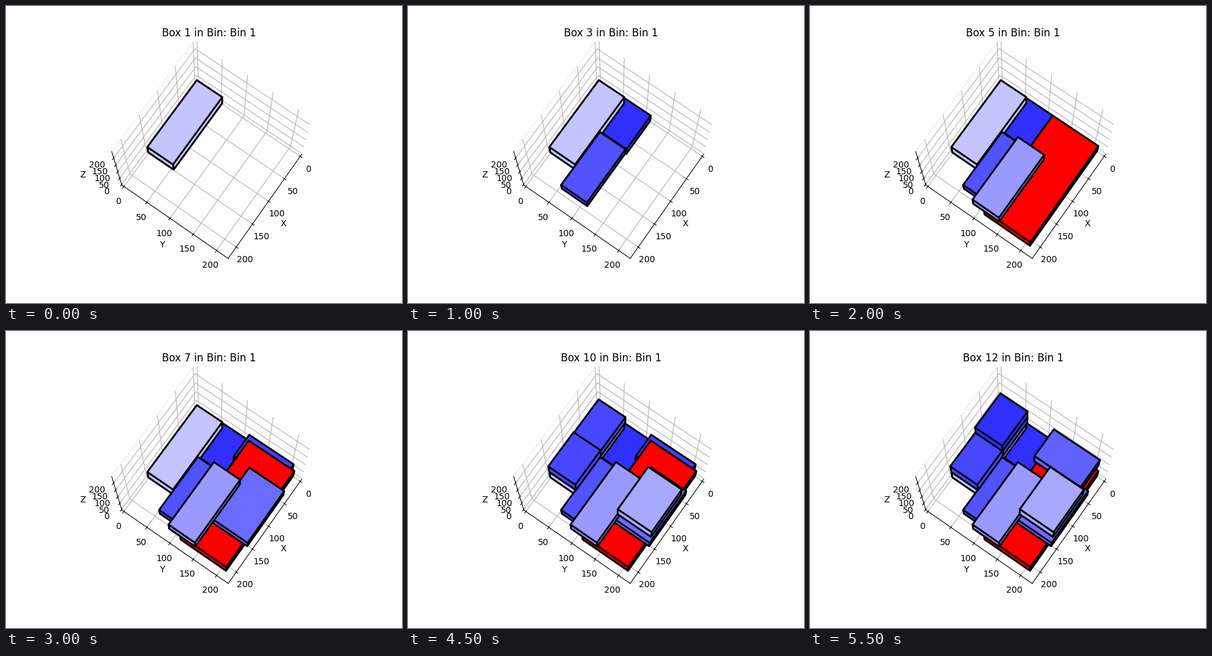
A matplotlib script for the animation above (6000 ms loop, 640 by 480 pixels).

```python
import matplotlib.pyplot as plt
import numpy as np
from itertools import product
from matplotlib.animation import FuncAnimation
from mpl_toolkits.mplot3d.art3d import Poly3DCollection

BACKGROUND = "#fdfdfd"
RED = (1, 0, 0)
MARGIN = 1 / 48


def blue(tint):
    return (tint, tint, 1)


def padded(size):
    return -size * MARGIN, size * (1 + MARGIN)


def box_faces(near, far):
    """Six quads of an axis-aligned box between two opposite corners."""
    ends = np.array([near, far])
    ring = [(0, 0), (1, 0), (1, 1), (0, 1)]
    faces = []
    for axis, side in product(range(3), (0, 1)):
        corners = [np.insert(pair, axis, side) for pair in ring]
        faces.append([ends[corner, range(3)] for corner in corners])
    return faces


fig = plt.figure(figsize=(6.4, 4.8), dpi=100, facecolor=BACKGROUND)
ax = fig.add_subplot(projection="3d")
ax.set_facecolor(BACKGROUND)
ax.set_box_aspect((1, 1, 1))
ax.view_init(elev=75, azim=35)

x_lim, y_lim, z_lim = padded(220), padded(220), padded(240)

# Faint upper rim of the left wall
ax.plot(x_lim, [y_lim[0]] * 2, [z_lim[1]] * 2, color="#e6e6e6",
        lw=0.8, ls="--")

far_corners = [np.zeros(3)]  # entry 0 is the corner of the bin
solids = []


def pack(size, color, x=0, y=0, z=0, shift=(0, 0, 0)):
    """Add a box that starts, on each axis, where the given box ends."""
    near = np.array([far_corners[box][axis]
                     for axis, box in enumerate((x, y, z))]) + shift
    far = near + size
    far_corners.append(far)
    solid = Poly3DCollection(box_faces(near, far), facecolors=[color],
                             edgecolors="black", linewidths=2)
    solids.append(ax.add_collection3d(solid))


pack((150, 55, 40), blue(0.77))
pack((75, 57, 35), blue(0.19), y=1)
pack((117, 55, 30), blue(0.32), x=2, y=1)
pack((209, 97, 35), RED, y=2)
pack((135, 55, 35), blue(0.60), x=2, y=2, z=4, shift=(0, -22.5, 0))
pack((47, 93, 38), blue(0.25), y=2, z=4)
pack((111, 73, 30), blue(0.42), x=6, y=5, z=4)
pack((75, 57, 35), blue(0.28), z=1)
pack((75, 57, 40), blue(0.28), x=8, z=1)
pack((90, 69, 40), blue(0.66), x=6, y=5, z=7, shift=(11, 0, 0))
pack((58, 95, 35), blue(0.38), y=2, z=6)
pack((75, 57, 35), blue(0.19), z=8)

ax.set(xlim=x_lim, ylim=y_lim, zlim=z_lim, xlabel="X", ylabel="Y", zlabel="Z")
for axis in (ax.xaxis, ax.yaxis, ax.zaxis):
    axis.set_pane_color(BACKGROUND)
title = ax.set_title("")


def update(step):
    for i, solid in enumerate(solids):
        solid.set_visible(i <= step)
    title.set_text(f"Box {step + 1} in Bin: Bin 1")
    return [*solids, title]


anim = FuncAnimation(fig, update, frames=len(solids), interval=500,
                     repeat=True, repeat_delay=0, blit=False)
plt.show()
```
